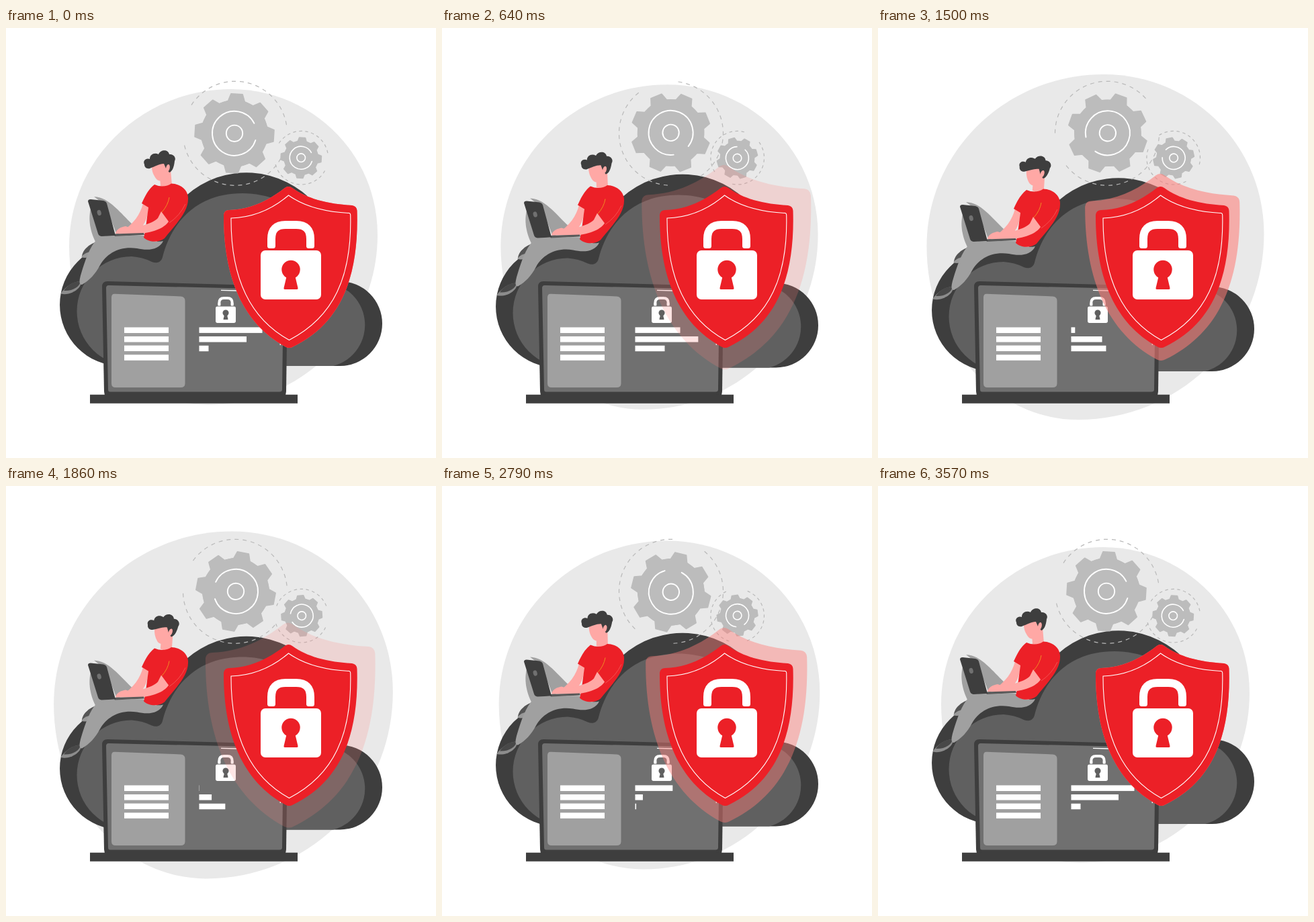
Recreate the animation shown at these times as an HTML page. Size 640 by 640 pixels, loop 3.64 s.

```html
<!DOCTYPE html>
<html lang="en">
<head>
<meta charset="utf-8">
<title>Cloud security</title>
<style>
  html, body { margin: 0; width: 100%; height: 100%; overflow: hidden; background: #fff; }
  svg { display: block; width: 100vw; height: 100vh; }
  .line { fill: none; stroke: #fff; }
  .dash { fill: none; stroke: #b9b9b9; stroke-width: 1.2; }
  .skin { fill: #ffa8a5; }
  .dark { fill: #3e3e3e; }
  .pants { fill: #a0a0a0; }
  .white { fill: #fff; }
</style>
</head>
<body>
<svg viewBox="0 0 640 640">
  <defs>
    <path id="shield" d="M415 238Q420.500 234 426 238C450 255 480 262 515 264Q522 265 522.500 272C525.500 372 498 440 427 474.500Q421.500 477.500 416 474.500C352 440 323.500 370 324 278Q325 271 332 271C365 270 392 256 415 238Z"/>
    <g id="lock">
      <rect width="90" height="73" rx="7" class="white"/>
      <path class="line" stroke-width="12" d="M16-9V-17Q16-38 37-38H53Q74-38 74-17V-9"/>
      <rect x="10" y="-16" width="12" height="13" rx="3.500" class="white"/>
      <rect x="68" y="-16" width="12" height="13" rx="3.500" class="white"/>
      <circle cx="45" cy="28.500" r="13.700"/>
      <path d="M39 37H51L55.500 56Q56 58 54 58H36Q34 58 34.500 56Z"/>
    </g>
  </defs>

  <path id="blob" fill="#e9e9e9" d="M94 325C94 195 203 91 335 91C455 91 553 187 553 308C553 448 440 561 300 561C186 561 94 455 94 325Z"/>

  <g id="cloud">
    <path class="dark" d="M171 503A91 91 0 0 1 171 321Q195 319 215 325C240 310 255 275 268 249.500A135 135 0 0 1 460 262L497 377A63 63 0 0 1 497 503Z"/>
    <path fill="#606060" d="M187 503A81 81 0 0 1 187 340Q203 341 217 348C224 351 231 349 233 341C243 300 275 246 352 246C400 246 440 270 460 300L471 379A63 63 0 0 1 487 503Z"/>
  </g>

  <g id="gears"></g>

  <g id="man">
    <g id="head">
      <path class="skin" d="M229 221L230 235Q238 239 247 234L245 211Z"/>
      <path class="skin" d="M217 207L238 199L246 209L244 219C238 228 229 230 224 225C219 219 217 212 217 207Z"/>
      <path class="dark" d="M206 203C203 197 209 193 214 195C214 188 221 185 227 188C230 181 241 180 243 188C249 187 254 193 251 198C250 208 247 214 243 215L238 209L235 202C228 202 222 206 214 209C209 210 206 207 206 203Z"/>
      <ellipse cx="241" cy="208.500" rx="2.800" ry="5.500" class="skin" transform="rotate(12 241 208)"/>
    </g>
    <path class="pants" d="M131 251C153 252 167 272 192 296L165 308L148 264Z"/>
    <path class="pants" d="M127 266C121 284 126 305 134 320L148 314L138 282Z"/>
    <path fill="#555" d="M113 340C114 330 125 320 139 317L127 334Q120 334 113 340Z"/>
    <path fill="#999" d="M112 341Q118 333 128 333L123 341Q117 343 112 341Z"/>
    <path fill="#8c8c8c" d="M82 394C90 384 100 377 112 377C113 388 95 399 82 395.500Z"/>
    <path fill="#484848" d="M86 391C92 382 101 377 111 377C110 385 99 392 86 391Z"/>
    <path class="pants" d="M150 309C175 310 195 308 205 309C212 318 225 319 234 317C228 330 212 332 195 328C170 324 150 335 140 353C133 366 124 376 113 382C108 382 109 375 112 365C118 345 125 325 135 315Q141 309 150 309Z"/>
    <path class="skin" d="M204 261L212 266C212 281 205 297 196 301L172 303C190 292 200 277 204 261Z"/>
    <path fill="#ec2027" d="M221 233C230 237 240 236 246 231.500C262 232 272 243 271 255C271 275 250 295 236 313C228 320 212 319 205 312C208 300 210 281 212 267L202 261C207 250 212 240 221 233Z"/>
    <path class="skin" d="M231 273L242 288C236 298 215 307 190 306L163 306C164 299 172 296 178 295L184 297C200 296 220 290 226 283Z"/>
    <path fill="none" stroke="#f08a24" d="M243 252Q241 264 232 274"/>
    <path fill="none" stroke="#f2605c" stroke-width=".8" d="M267 262Q259 279 243 290"/>
    <path fill="#5a5a5a" d="M160 306.500L205 305L206 308L162 310Z"/>
    <path class="dark" d="M122 258Q122 255 126 255L145 257Q149 258 150 261L163 309L142 310Q138 309.500 137 306Z"/>
    <ellipse cx="138.700" cy="275" rx="3" ry="4.200" fill="#707070" transform="rotate(-15 138.700 275)"/>
  </g>

  <path class="dark" d="M143 385Q143 377 151 377L410 384Q419 385 419 393L417 541L416 547H147L146 541Z"/>
  <path fill="#707070" d="M149 387Q149 383 153 383L409 389Q413 389 413 394L411 538Q411 541.500 407 541.500H155Q152 541.500 152 538Z"/>
  <rect x="125" y="545.700" width="309" height="13" class="dark"/>
  <path fill="#a0a0a0" d="M157 401Q157 395.500 162 395.700L260 399.500Q266.500 400 266.500 406V529Q266.500 535 260 535H163Q157 535 157 529Z"/>
  <path class="line" stroke-width="1.300" d="M320 390.300L345 391M408.300 462V472"/>
  <path class="line" stroke-width="8.500" d="M176 449.700H242M176 463.200H242M176 476.800H242M176 490.500H242"/>
  <rect class="row white" x="287.500" y="445.400" height="8.500"/>
  <rect class="row white" x="287.500" y="459" height="8.500"/>
  <rect class="row white" x="287.500" y="472.700" height="8.500"/>
  <use href="#lock" transform="translate(312 414.600) scale(.3333)" fill="#606060"/>

  <use id="pulse" href="#shield" fill="#ff7b76"/>
  <use href="#shield" fill="#ec2027"/>
  <path class="line" stroke-width="1.100" d="M420.500 249C447 268 480 274 511 275.500Q512.500 276 512.700 278C515 370 488 430 421.500 464.500C362 432 334.500 370 335 283C368 282 396 270 420.500 249Z"/>
  <use href="#lock" transform="translate(379 331)" fill="#ec2027"/>
</svg>

<script>
const LOOP = 3640, FRAME = 500 / 7, STEPS = 50;
const $ = id => document.getElementById(id);
const rows = [...document.querySelectorAll('.row')];
const rowMax = [94, 94, 56];

const polar = (r, deg) => {
  const a = deg * Math.PI / 180;
  return (r * Math.cos(a)).toFixed(2) + ' ' + (r * Math.sin(a)).toFixed(2);
};
const arc = (r, from, to) =>
  `M${polar(r, from)}A${r} ${r} 0 ${to - from > 180 ? 1 : 0} 1 ${polar(r, to)}`;

function cog(r, start) {
  const pts = [];
  for (let k = 0; k < 8; k++) {
    const a = start + k * 45;
    pts.push(polar(r * .82, a - 14.5), polar(r * .985, a - 8.3),
             polar(r * .985, a + 8.3), polar(r * .82, a + 14.5));
  }
  return 'M' + pts.join('L') + 'Z';
}

// The wheel sits slightly off its pivot, so it wobbles as it turns.
function addGear({ x, y, r, hub, ring, orbit, dash, off, line, dir }) {
  const g = document.createElementNS('http://www.w3.org/2000/svg', 'g');
  g.innerHTML =
    `<path class="dash" stroke-dasharray="${dash}" d="${arc(orbit, -147, -7)}${arc(orbit, 29, 169)}"/>
     <g transform="translate(${-off} 0)">
       <circle r="${r * .83}" fill="#bcbcbc"/>
       <path d="${cog(r, 3.5)}" fill="#bcbcbc" stroke="#bcbcbc" stroke-width="1.800" stroke-linejoin="round"/>
       <circle r="${hub}" class="line" stroke-width="${line}"/>
       <path d="${arc(ring, 18, 333)}" class="line" stroke-width="${line}" stroke-linecap="round"/>
     </g>`;
  $('gears').append(g);
  return turn => g.setAttribute('transform', `translate(${x} ${y}) rotate(${dir * turn})`);
}

const turnGears = [
  addGear({ x: 341, y: 156.8, r: 60, hub: 12.2, ring: 33, orbit: 77.5, dash: '6 6', off: 1, line: 1.9, dir: 1 }),
  addGear({ x: 439.7, y: 193.2, r: 30.7, hub: 6.3, ring: 17, orbit: 39.8, dash: '4.5 4.5', off: .5, line: 1.6, dir: -1 })
];

const wave = p => (1 - Math.cos(2 * Math.PI * p)) / 2;

// cubic-bezier(1/3, 0, 0, 1)
function burst(x) {
  let lo = 0, hi = 1;
  for (let n = 0; n < 20; n++) {
    const m = (lo + hi) / 2;
    if (m * (1 - m) ** 2 + m ** 3 < x) lo = m; else hi = m;
  }
  return lo * lo * (3 - 2 * lo);
}

const scaleAt = (x, y, s) => `translate(${x} ${y}) scale(${s}) translate(${-x} ${-y})`;

function draw(ms) {
  const p = Math.floor((ms % LOOP + 5) / FRAME) % STEPS / STEPS;
  const w = wave(p), drop = `translate(0 ${8.5 * w})`;

  $('blob').setAttribute('transform', scaleAt(323.7, 326, 1 + .1 * w));
  $('cloud').setAttribute('transform', drop);
  $('man').setAttribute('transform', drop);
  $('head').setAttribute('transform', `rotate(${9 * w} 238 233)`);
  turnGears.forEach(turn => turn(360 * p));
  rows.forEach((row, k) => row.setAttribute('width', rowMax[k] * (1 - wave(p - k / 6))));

  const q = p * 3 % 1;
  $('pulse').setAttribute('transform', scaleAt(423.7, 356, 1 + .3 * burst(q)));
  $('pulse').setAttribute('opacity', (1 - q) ** 2);
}

const start = performance.now();
function tick() {
  draw(performance.now() - start);
  requestAnimationFrame(tick);
}
tick();
</script>
</body>
</html>
```
